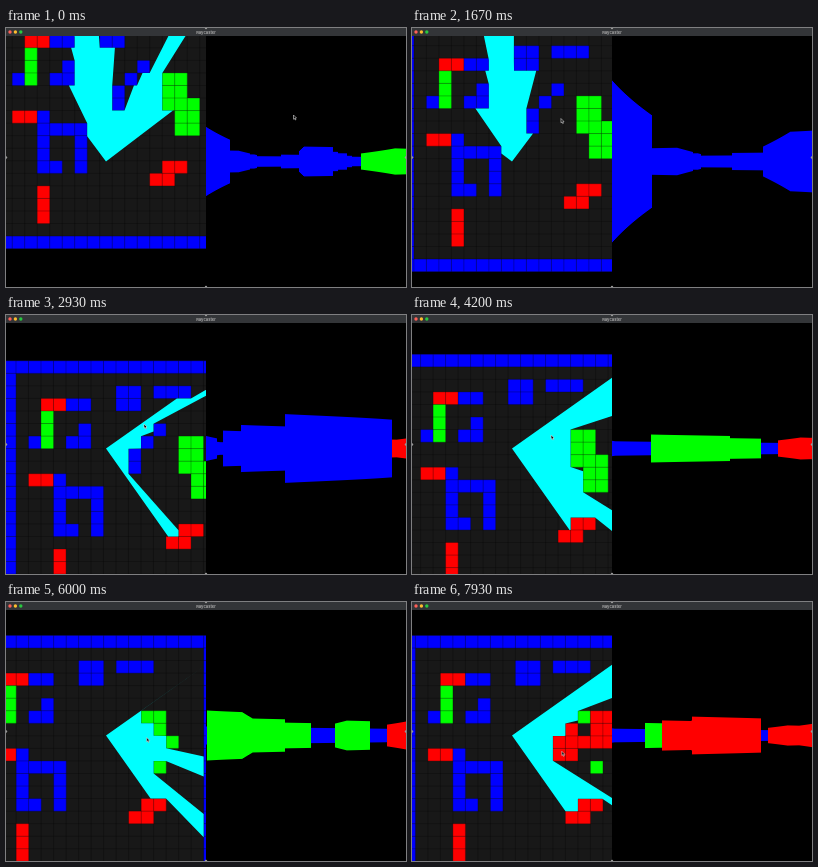
Recreate the animation shown at these times as an HTML page with a canvas. Size 400x259 px, loop 8000 ms.

```html
<!DOCTYPE html>
<html lang="en">
<head>
<meta charset="utf-8">
<title>Raycaster</title>
<style>
  html, body { margin: 0; height: 100%; overflow: hidden; background: #000; }
  canvas { display: block; width: 100vw; height: 100vh; }
</style>
</head>
<body>
<canvas id="stage"></canvas>
<script>
const W = 400, H = 259, BAR = 8, HALF = 200, MID_Y = 133.5;
const CELL_W = 12.5, CELL_H = 12.55, SIZE = 20;
const RAYS = 400, FOV = Math.PI / 2, WALL_SCALE = 122;
const LOOP = 8000;
const BLUE = '#0000ff', RED = '#ff0000', GREEN = '#00ff00', CYAN = '#00ffff';

// Each brush path visits its corner cells (column,row) in straight or diagonal lines
const walls = {
  [BLUE]: ['0,0 19,0 19,19 0,19 0,0', '5,3 6,3', '9,2 10,2 10,3 9,3', '12,2 14,2', '2,6',
           '5,6 6,6 6,5', '12,5 10,7 10,8', '4,9 4,13 5,13', '4,10 7,10 7,13'],
  [RED]: ['3,3 4,3', '2,9 3,9', '4,15 4,17', '15,13 14,13 14,14 13,14'],
  [GREEN]: ['3,4 3,6', '14,6 14,8', '15,6 15,10 16,10 16,8'],
};

// Mouse strokes that erase or paint cells one after another
const strokes = [
  { colour: null, path: '12,5 10,7 10,8', from: 3100, to: 3500 },
  { colour: null, path: '14,8 15,8', from: 5000, to: 5200 },
  { colour: null, path: '14,7 15,8 15,9 16,9 16,10', from: 5500, to: 6000 },
  { colour: RED, path: '14,8 16,8 16,6 15,6 15,7', from: 6250, to: 6900 },
  { colour: RED, path: '13,7 13,9 12,9 12,8', from: 7650, to: 7900 },
];

// Time, x and y in cells, heading in degrees
const playerKeys = [
  [0, 9.5, 13.06, -82], [735, 13.11, 11.67, -95.8], [805, 13.11, 11.67, -95.8],
  [1670, 8.85, 11.23, -97.9], [2930, 8.2, 6.99, 9.75], [5330, 10.3, 7.97, 9.75],
  [7130, 12.68, 7.98, 9.75], [7930, 8.73, 7.97, 9.75],
];
// Time, x and y in pixels
const cursorKeys = [
  [0, 287.5, 87], [870, 287.5, 87], [1600, 149.6, 89.5],
  [2930, 138, 109], [7130, 141.7, 145.3], [7930, 149.8, 149.3],
];

const canvas = document.getElementById('stage');
const ctx = canvas.getContext('2d');
const ratio = window.devicePixelRatio || 1;
canvas.width = W * ratio;
canvas.height = H * ratio;

function sample(keys, t) {
  const next = keys.findIndex(key => key[0] > t);
  if (next < 0) return keys[keys.length - 1].slice(1);
  const a = keys[next - 1], b = keys[next];
  const k = (t - a[0]) / (b[0] - a[0]);
  return a.slice(1).map((v, i) => v + (b[i + 1] - v) * k);
}

function cellsAlong(path) {
  const corners = path.split(' ').map(corner => corner.split(',').map(Number));
  let [col, row] = corners[0];
  const cells = [[col, row]];
  for (const [toCol, toRow] of corners)
    while (col !== toCol || row !== toRow) {
      col += Math.sign(toCol - col);
      row += Math.sign(toRow - row);
      cells.push([col, row]);
    }
  return cells;
}

function buildGrid(t) {
  const grid = Array.from({ length: SIZE }, () => Array(SIZE).fill(null));
  const paint = (cells, colour) => cells.forEach(([col, row]) => grid[row][col] = colour);
  for (const [colour, paths] of Object.entries(walls))
    for (const path of paths) paint(cellsAlong(path), colour);
  for (const { colour, path, from, to } of strokes) {
    const cells = cellsAlong(path);
    const progress = Math.min(1, Math.max(0, (t - from) / (to - from)));
    paint(cells.slice(0, Math.ceil(progress * cells.length)), colour);
  }
  return grid;
}

// Steps from cell edge to cell edge until a wall is met
function castRay(grid, x, y, angle) {
  const dx = Math.cos(angle), dy = Math.sin(angle);
  let col = Math.floor(x), row = Math.floor(y), dist = 0;
  let nextX = (col + (dx > 0) - x) / dx;
  let nextY = (row + (dy > 0) - y) / dy;
  for (;;) {
    if (nextX < nextY) {
      dist = nextX; nextX += Math.abs(1 / dx); col += Math.sign(dx);
    } else {
      dist = nextY; nextY += Math.abs(1 / dy); row += Math.sign(dy);
    }
    const colour = grid[row]?.[col];
    if (colour !== null) return { dist, colour: colour || '#000', dx, dy };
  }
}

function drawMap(grid, x, y, rays) {
  const left = HALF / 2 - x * CELL_W, top = MID_Y - y * CELL_H;
  const width = SIZE * CELL_W, height = SIZE * CELL_H;
  ctx.save();
  ctx.beginPath();
  ctx.rect(0, BAR, HALF, H - BAR);
  ctx.clip();
  ctx.fillStyle = '#181818';
  ctx.fillRect(left, top, width, height);
  grid.forEach((cells, r) => cells.forEach((colour, c) => {
    if (!colour) return;
    ctx.fillStyle = colour;
    ctx.fillRect(left + c * CELL_W, top + r * CELL_H, CELL_W + 0.1, CELL_H + 0.1);
  }));

  ctx.beginPath();
  for (let i = 0; i <= SIZE; i++) {
    const lineX = left + i * CELL_W, lineY = top + i * CELL_H;
    ctx.moveTo(lineX, top); ctx.lineTo(lineX, top + height);
    ctx.moveTo(left, lineY); ctx.lineTo(left + width, lineY);
  }
  ctx.strokeStyle = 'rgba(0,0,0,.45)';
  ctx.lineWidth = 0.6;
  ctx.stroke();

  ctx.beginPath();
  ctx.moveTo(HALF / 2, MID_Y);
  for (const { dist, dx, dy } of rays)
    ctx.lineTo(HALF / 2 + dx * dist * CELL_W, MID_Y + dy * dist * CELL_H);
  ctx.fillStyle = CYAN;
  ctx.fill();
  ctx.restore();
}

function drawView(rays, heading) {
  const perColumn = RAYS / HALF;
  for (let i = 0; i < HALF; i++) {
    const { dist, colour, dx, dy } = rays[i * perColumn];
    const depth = dist * (dx * Math.cos(heading) + dy * Math.sin(heading));
    const height = Math.min(H - BAR, WALL_SCALE / depth);
    ctx.fillStyle = colour;
    ctx.fillRect(HALF + i, MID_Y - height / 2, 1, height);
  }
}

function dot(x, y, radius, colour) {
  ctx.fillStyle = colour;
  ctx.beginPath();
  ctx.arc(x, y, radius, 0, 2 * Math.PI);
  ctx.fill();
}

function drawWindow() {
  ctx.fillStyle = '#333538';
  ctx.fillRect(0, 0, W, BAR);
  ['#ff5f57', '#febc2e', '#28c840'].forEach((colour, i) => dot(4 + i * 5.4, 4, 1.7, colour));
  ctx.fillStyle = '#b0b0b0';
  ctx.font = '600 4.1px Inter, sans-serif';
  ctx.textAlign = 'center';
  ctx.fillText('Raycaster', HALF, 5.5);
  for (const [x, y] of [[0, 129.5], [W, 129.5], [HALF, 0], [HALF, H]]) dot(x, y, 1.2, '#999');
}

function drawCursor(x, y) {
  ctx.save();
  ctx.translate(x, y);
  ctx.beginPath();
  for (const [px, py] of [[0, 0], [0, 4.2], [1, 3.4], [1.7, 5], [2.4, 4.7], [1.8, 3.1], [3, 3]])
    ctx.lineTo(px, py);
  ctx.closePath();
  ctx.fillStyle = '#000';
  ctx.strokeStyle = '#ddd';
  ctx.lineWidth = 0.6;
  ctx.fill();
  ctx.stroke();
  ctx.restore();
}

function draw(t) {
  const [x, y, degrees] = sample(playerKeys, t);
  const heading = degrees * Math.PI / 180;
  const grid = buildGrid(t);
  const rays = Array.from({ length: RAYS }, (_, i) =>
    castRay(grid, x, y, heading + FOV * ((i + 0.5) / RAYS - 0.5)));

  ctx.setTransform(ratio, 0, 0, ratio, 0, 0);
  ctx.fillStyle = '#000';
  ctx.fillRect(0, 0, W, H);
  drawMap(grid, x, y, rays);
  drawView(rays, heading);
  drawWindow();
  drawCursor(...sample(cursorKeys, t));
}

const start = performance.now();
function tick() {
  draw((performance.now() - start) % LOOP);
  requestAnimationFrame(tick);
}
tick();
</script>
</body>
</html>
```
